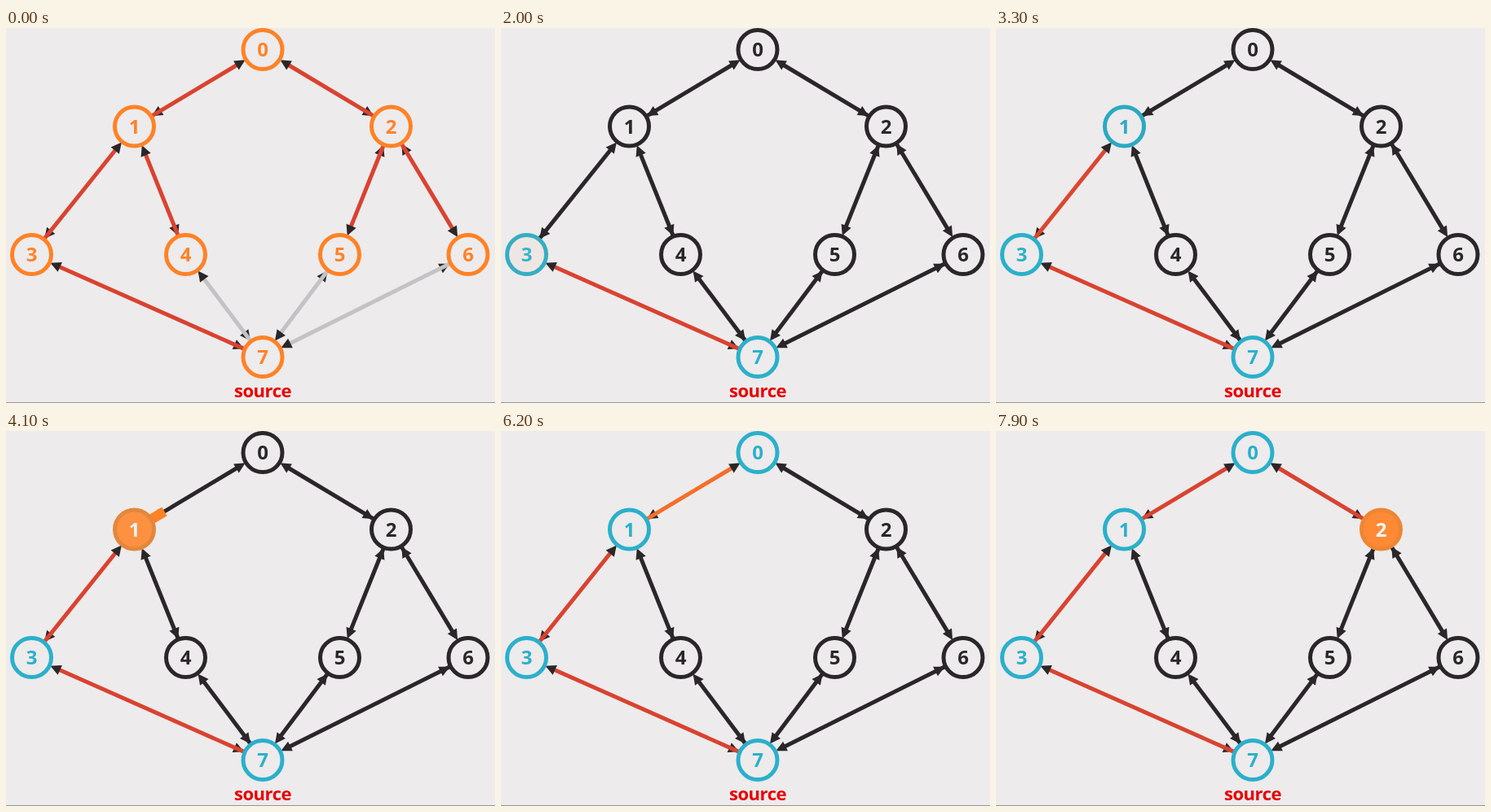
Write an HTML page that moves like this. It is 600 by 461 pixels and loops after 8000 ms.

```html
<!DOCTYPE html>
<html lang="en">
<head>
<meta charset="utf-8">
<title>Depth-first search</title>
<style>
  html, body { margin: 0; width: 100%; height: 100%; overflow: hidden; background: #edebec; }
  svg { display: block; width: 600px; height: 461px; }
  text { font-family: "Open Sans", "Noto Sans", sans-serif; font-weight: 700; text-anchor: middle; }
</style>
</head>
<body>
<svg id="stage" viewBox="0 0 600 461"></svg>
<script>
const LOOP = 8000;
const STEP = 513;   // length of one search state
const TRIM = 25;    // edges stop this far from a node centre

const PAPER = [237, 235, 236], INK = [42, 38, 41], ORANGE = [255, 130, 38],
      CYAN = [43, 176, 203], RED = [217, 67, 48], GREY = [195, 194, 196], WHITE = [255, 255, 255];

// node looks: ring, fill, digit
const DONE = [ORANGE, PAPER, ORANGE];
const PLAIN = [INK, PAPER, INK];
const HOT = [ORANGE, ORANGE, WHITE];
const SEEN = [CYAN, PAPER, CYAN];

const spots = [[315, 26.5], [157.5, 121], [472.5, 121], [31.5, 278.5],
               [220.5, 278.5], [409.5, 278.5], [567, 278.5], [315, 404.5]];

// [tail, head, first colour]; the line runs over the arrow at its tail
const links = [[1, 0, RED], [2, 0, RED], [3, 1, RED], [4, 1, RED], [2, 5, RED],
               [2, 6, RED], [7, 3, RED], [7, 4, GREY], [5, 7, GREY], [6, 7, GREY]];

// [from, to, start] of each edge being tried
const visits = [[7, 3, 859], [3, 1, 2397], [1, 0, 3935], [0, 1, 5473], [0, 2, 6500]];

const stage = document.getElementById("stage");

function add(tag, attrs) {
  const el = document.createElementNS("http://www.w3.org/2000/svg", tag);
  for (const k in attrs) el.setAttribute(k, attrs[k]);
  return stage.appendChild(el);
}

const rgb = c => `rgb(${c.map(Math.round).join()})`;
const mix = (a, b, k) => a.map((v, i) => v + (b[i] - v) * k);

function ease(x) {
  x = Math.min(1, Math.max(0, x));
  return x < 0.5 ? 4 * x ** 3 : 1 - 4 * (1 - x) ** 3;
}

// geometry of the straight way between two nodes
function ray(a, b) {
  const [x, y] = spots[a], dx = spots[b][0] - x, dy = spots[b][1] - y;
  const len = Math.hypot(dx, dy), ux = dx / len, uy = dy / len;
  return { len, at: (d, side = 0) => [x + ux * d - uy * side, y + uy * d + ux * side] };
}

function segment(r, from, to) {
  return `M${r.at(from)}L${r.at(to)}`;
}

function arrow(a, b) {
  const r = ray(a, b), tip = r.len - TRIM;
  add("path", { d: `M${r.at(tip)}L${r.at(tip - 13, 6.5)}L${r.at(tip - 13, -6.5)}Z`, fill: rgb(INK) });
}

const edges = links.map(([a, b, color]) => {
  const r = ray(a, b);
  arrow(b, a);
  const line = add("path", { d: segment(r, TRIM, r.len - TRIM - 9), "stroke-width": 5 });
  arrow(a, b);
  return { ends: [a, b], line, first: color, cues: [[5, INK, STEP]] };
});

const beams = visits.map(([a, b, start]) => ({
  start, r: ray(a, b), line: add("path", { stroke: rgb(ORANGE), "stroke-width": 12.4 })
}));

const nodes = spots.map(([x, y], i) => {
  const disc = add("circle", { cx: x, cy: y, r: 24, "stroke-width": 5 });
  const digit = add("text", { x, y: y + 8.8, "font-size": 24 });
  digit.textContent = i;
  return { disc, digit, cues: [[5, i === 7 ? HOT : PLAIN]] };
});

const label = add("text", { x: 315, y: 453.5, "font-size": 22, "letter-spacing": -0.5, fill: "#ea0000" });
label.textContent = "source";
add("rect", { x: 0, y: 460, width: 600, height: 1, fill: "#969596" });

// turn the visits into colour cues
const reached = new Set([7]);
for (const [a, b, start] of visits) {
  const end = start + STEP;
  nodes[a].cues.push([start, SEEN]);
  const edge = edges.find(e => e.ends.includes(a) && e.ends.includes(b));
  edge.cues.push([end, ORANGE, 0], [end, RED, STEP]);
  if (!reached.has(b)) {
    reached.add(b);
    nodes[b].cues.push([end, SEEN], [end + STEP, HOT]);
  }
}

function edgeColor(edge, t) {
  let c = edge.first;
  for (const [start, goal, span] of edge.cues) {
    if (t >= start) c = mix(c, goal, span ? ease((t - start) / span) : 1);
  }
  return c;
}

function nodeLook(node, t) {
  let look = DONE;
  for (const [start, goal] of node.cues) {
    const k = ease((t - start) / STEP);
    look = look.map((c, i) => mix(c, goal[i], k));
  }
  return look;
}

function draw(t) {
  for (const e of edges) e.line.setAttribute("stroke", rgb(edgeColor(e, t)));
  for (const { start, r, line } of beams) {
    const x = (t - start) / STEP, on = x > 0 && x < 1;
    line.setAttribute("visibility", on ? "visible" : "hidden");
    if (on) line.setAttribute("d", segment(r, TRIM, TRIM + (r.len - 2 * TRIM) * ease(x)));
  }
  for (const n of nodes) {
    const [ring, fill, ink] = nodeLook(n, t);
    n.disc.setAttribute("stroke", rgb(ring));
    n.disc.setAttribute("fill", rgb(fill));
    n.digit.setAttribute("fill", rgb(ink));
  }
}

const began = performance.now();
function tick() {
  draw((performance.now() - began) % LOOP);
  requestAnimationFrame(tick);
}
draw(0);
requestAnimationFrame(tick);
</script>
</body>
</html>
```
